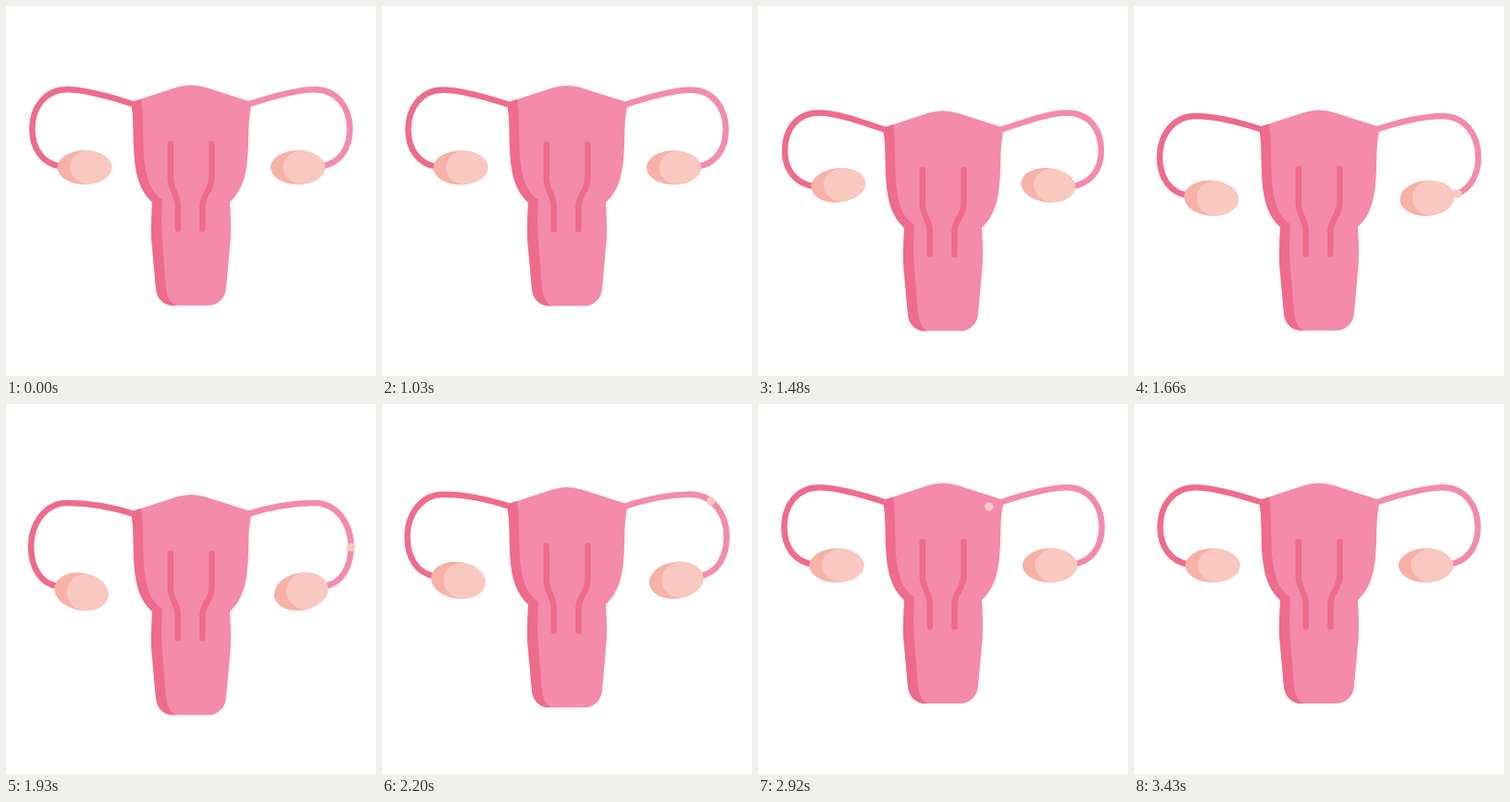
These frames come from a looping animation (400x400 px, 3460 ms). An HTML page:

```html
<!DOCTYPE html>
<html lang="en">
<head>
<meta charset="utf-8">
<title>Ovulation</title>
<style>
  html, body { margin: 0; height: 100%; overflow: hidden; background: #fff; }
  svg { display: block; width: 100vw; height: 100vh; }
  .tube, .fold { fill: none; stroke: #ee6b8b; stroke-width: 6.5; }
  .fold { stroke-linecap: round; }
  #rightTube { stroke: #f48baa; }
</style>
</head>
<body>
<svg viewBox="0 0 400 400">
  <defs>
    <g id="ovary">
      <ellipse rx="29.5" ry="18.5" fill="#f6b2a7"/>
      <path d="M4-18.33A29.5 18.5 0 0 1 4 18.33A21.7 18.4 0 0 1 4-18.33" fill="#f9c9c1"/>
    </g>
  </defs>
  <path id="leftTube" class="tube"/>
  <path id="rightTube" class="tube" transform="translate(400) scale(-1 1)"/>
  <g id="uterus">
    <path fill="#f48baa" d="M135 104L184 88Q200 83 216 88L266 104
      C261 125 263 140 261.500 160C260 184 255 200 242 212
      C243 230 243.500 240 242.500 255L238 305C237 317 228 323.700 219 323.700
      H181C171 323.700 163 317 162 305L157.500 255C156.500 240 157.500 230 158 212
      C145 200 140 184 138.500 160C137 140 139 125 135 104"/>
    <path fill="#ee6b8b" d="M135 104L146 100.400C150 125 147 150 150 170
      C152 190 158 202 169 209C168 230 168 240 169 255L173 305
      C174 314 178 322 184 323.700H181C171 323.700 163 317 162 305
      L157.500 255C156.500 240 157.500 230 158 212
      C145 200 140 184 138.500 160C137 140 139 125 135 104"/>
    <path class="fold" d="M177.800 149v36c0 16 8 17 8 32v24M222.400 149v36c0 16-10 17-10 32v24"/>
  </g>
  <circle id="egg" r="4.7" fill="#f9c9c1"/>
  <use id="leftOvary" href="#ovary"/>
  <use id="rightOvary" href="#ovary"/>
</svg>
<script>
const LOOP = 3460;
const [leftTube, rightTube, uterus, egg, leftOvary, rightOvary] =
  ['leftTube', 'rightTube', 'uterus', 'egg', 'leftOvary', 'rightOvary']
    .map(id => document.getElementById(id));

// cubic-bezier(x1, 0, x2, 1) progress between two times
function ease(t, start, end, x1, x2) {
  const x = Math.min(1, Math.max(0, (t - start) / (end - start)));
  let lo = 0, hi = 1;
  for (let i = 0; i < 24; i++) {
    const s = (lo + hi) / 2, r = 1 - s;
    if (3 * r * r * s * x1 + 3 * r * s * s * x2 + s ** 3 < x) lo = s; else hi = s;
  }
  return lo * lo * (3 - 2 * lo);
}

const sine = (t, start, end) => ease(t, start, end, .37, .63);

function placeEgg(t) {
  egg.style.display = t > 1500 && t < 3425 ? '' : 'none';
  const along = 190 - .169 * (t - 1660);
  let x, y;
  if (along > 0) {
    const p = rightTube.getPointAtLength(along);
    x = 400 - p.x;
    y = p.y;
  } else {
    const s = Math.min(1, (t - 2784) / 626), r = 1 - s;
    x = r * r * 262 + 2 * r * s * 231 + s * s * 224;
    y = r * r * 106 + 2 * r * s * 115 + s * s * 145;
  }
  egg.setAttribute('cx', x);
  egg.setAttribute('cy', y);
}

function draw(t) {
  // drop: how far the uterus sinks; swing: how far the ovaries trail behind it
  const drop = 28.5 * (ease(t, 1000, 1550, .2, .59) - ease(t, 1550, 2800, .26, .14));
  const swing = -14.7 * sine(t, 1000, 1310) + 30.7 * sine(t, 1310, 1880) - 16 * sine(t, 1880, 2800);
  const angle = .7 * swing;
  const stretch = 1 + .006 * Math.max(0, swing);

  const ovaryX = 85 - .22 * swing, ovaryY = 174.5 + drop + swing;
  const topY = 90.2 + drop + .27 * swing;
  const sideX = 28.3 - .08 * swing, sideY = 133 + drop + .5 * swing;
  const endX = ovaryX - 25, endY = ovaryY - 1 - 25 * Math.sin(angle * Math.PI / 180);

  const tube = `M140 ${107 + drop}C110 ${97 + drop} 85 ${topY} 66 ${topY}` +
    `C42 ${topY} ${sideX} ${sideY - 23} ${sideX} ${sideY}` +
    `C${sideX} ${sideY + 22} ${endX - 20} ${endY - 2.5} ${endX} ${endY}`;
  leftTube.setAttribute('d', tube);
  rightTube.setAttribute('d', tube);
  uterus.setAttribute('transform', `translate(0 ${drop})`);

  const pose = (x, a) => `translate(${x} ${ovaryY}) rotate(${a}) scale(1 ${stretch})`;
  leftOvary.setAttribute('transform', pose(ovaryX, angle));
  rightOvary.setAttribute('transform', pose(400.5 - ovaryX, -angle));
  placeEgg(t);
}

const begin = performance.now();
function frame() {
  draw((performance.now() - begin) % LOOP);
  requestAnimationFrame(frame);
}
frame();
</script>
</body>
</html>
```
